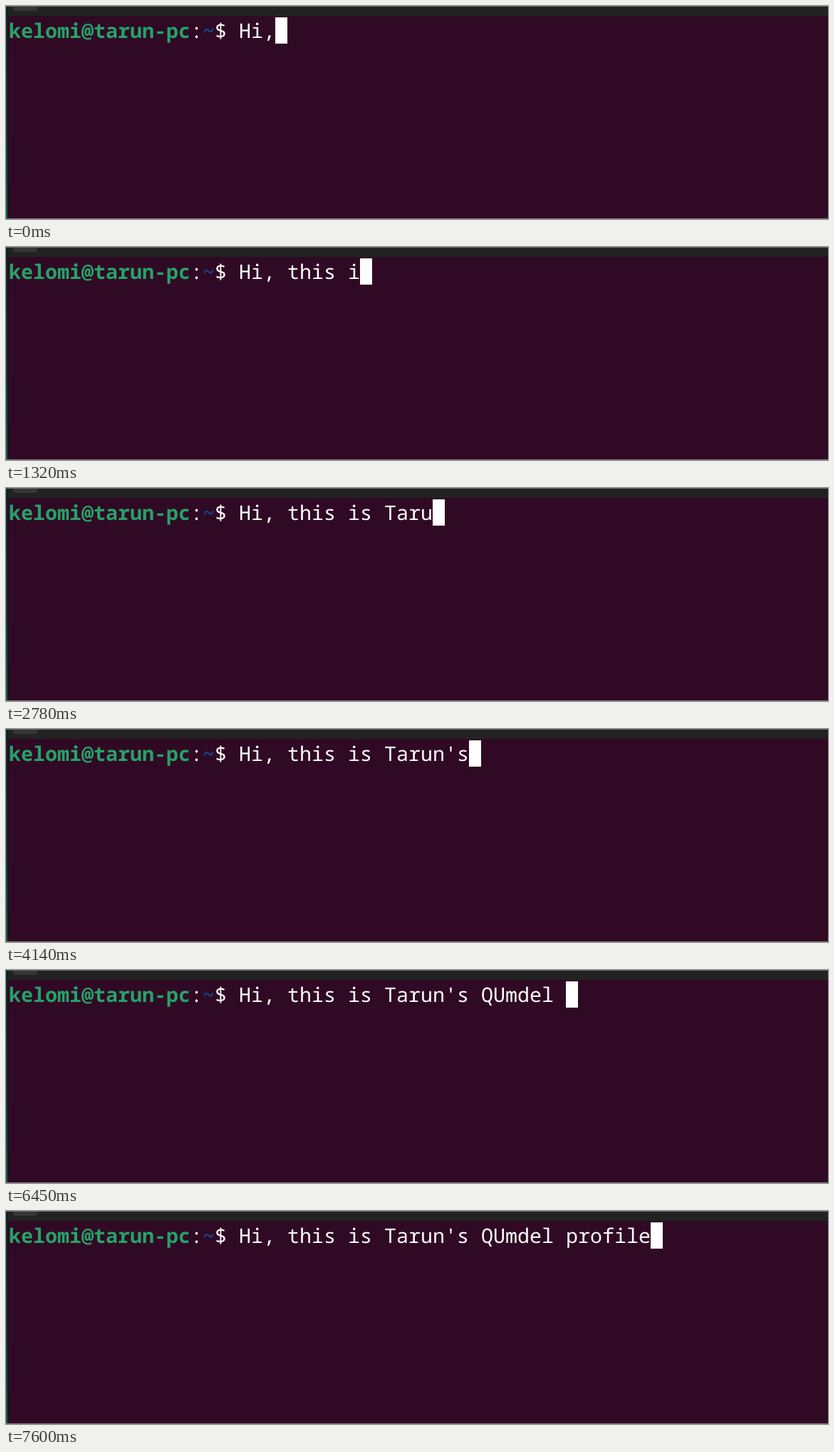
These frames come from a looping animation (1154x300 px, 8000 ms). An HTML page:

```html
<!DOCTYPE html>
<html lang="en">
<head>
<meta charset="utf-8">
<title>Terminal typing</title>
<style>
  html, body { margin: 0; width: 100%; height: 100%; overflow: hidden; background: #300a24; }
  svg { display: block; width: 100vw; height: 100vh; }
  text {
    font: 400 28.333px "Noto Sans Mono", monospace;
    white-space: pre;
    text-rendering: geometricPrecision;
    font-variant-ligatures: none;
    fill: #fff;
  }
  .host { font-weight: 700; fill: #26a269; }
  .path { font-weight: 700; fill: #12488b; }
</style>
</head>
<body>
<svg viewBox="0 0 1154 300" preserveAspectRatio="none">
  <defs>
    <linearGradient id="edge" x1="0" y1="0" x2="0" y2="1">
      <stop offset="0" stop-color="#062b2e"/>
      <stop offset=".6" stop-color="#07403a"/>
      <stop offset="1" stop-color="#0a6b4d"/>
    </linearGradient>
  </defs>
  <rect width="1154" height="300" fill="#300a24"/>
  <rect width="1154" height="14" fill="#222"/>
  <path d="M10 0H44V3Q44 7 40 7H14Q10 7 10 3Z" fill="#363636"/>
  <rect width="1154" height="1" fill="#6e6e6e"/>
  <rect y="1" width="2" height="298" fill="url(#edge)"/>
  <rect x="2" y="1" width="1" height="298" fill="#1c1019"/>
  <rect y="299" width="1154" height="1" fill="#85767f"/>
  <g id="line"></g>
  <rect id="cursor" y="16" width="17" height="37" fill="#fff"/>
</svg>
<script>
const LOOP = 8000, CELL = 17, LEFT = 4, BASELINE = 45;
const MESSAGE = "Hi, this is Tarun's QUmdel profile";

// Moments at which one more character appears; a repeated moment adds two.
const KEYS = [
  150, 550, 800, 800, 920, 1060, 1320, 1440, 1580, 1980,
  2530, 2650, 2780, 3360, 4140, 4140, 4420, 5100, 5250, 5650,
  5770, 5920, 6200, 6450, 6760, 6900, 7030, 7180, 7320, 7470, 7600
];
const FIRST = MESSAGE.length - KEYS.length;

const line = document.getElementById("line");
const cursor = document.getElementById("cursor");
let column = 0;

function addText(content, style = "") {
  const node = document.createElementNS("http://www.w3.org/2000/svg", "text");
  node.setAttribute("x", LEFT + column * CELL);
  node.setAttribute("y", BASELINE);
  node.setAttribute("class", style);
  node.textContent = content;
  line.append(node);
  column += content.length;
  return node;
}

addText("kelomi@tarun-pc", "host");
addText(":");
addText("~", "path");
addText("$ ");
const typed = addText("");

function render(time) {
  const count = FIRST + KEYS.filter(key => key <= time).length;
  typed.textContent = MESSAGE.slice(0, count);
  cursor.setAttribute("x", LEFT + (column + count) * CELL);
}

const start = performance.now();
function tick() {
  render((performance.now() - start) % LOOP);
  requestAnimationFrame(tick);
}
tick();
</script>
</body>
</html>
```
